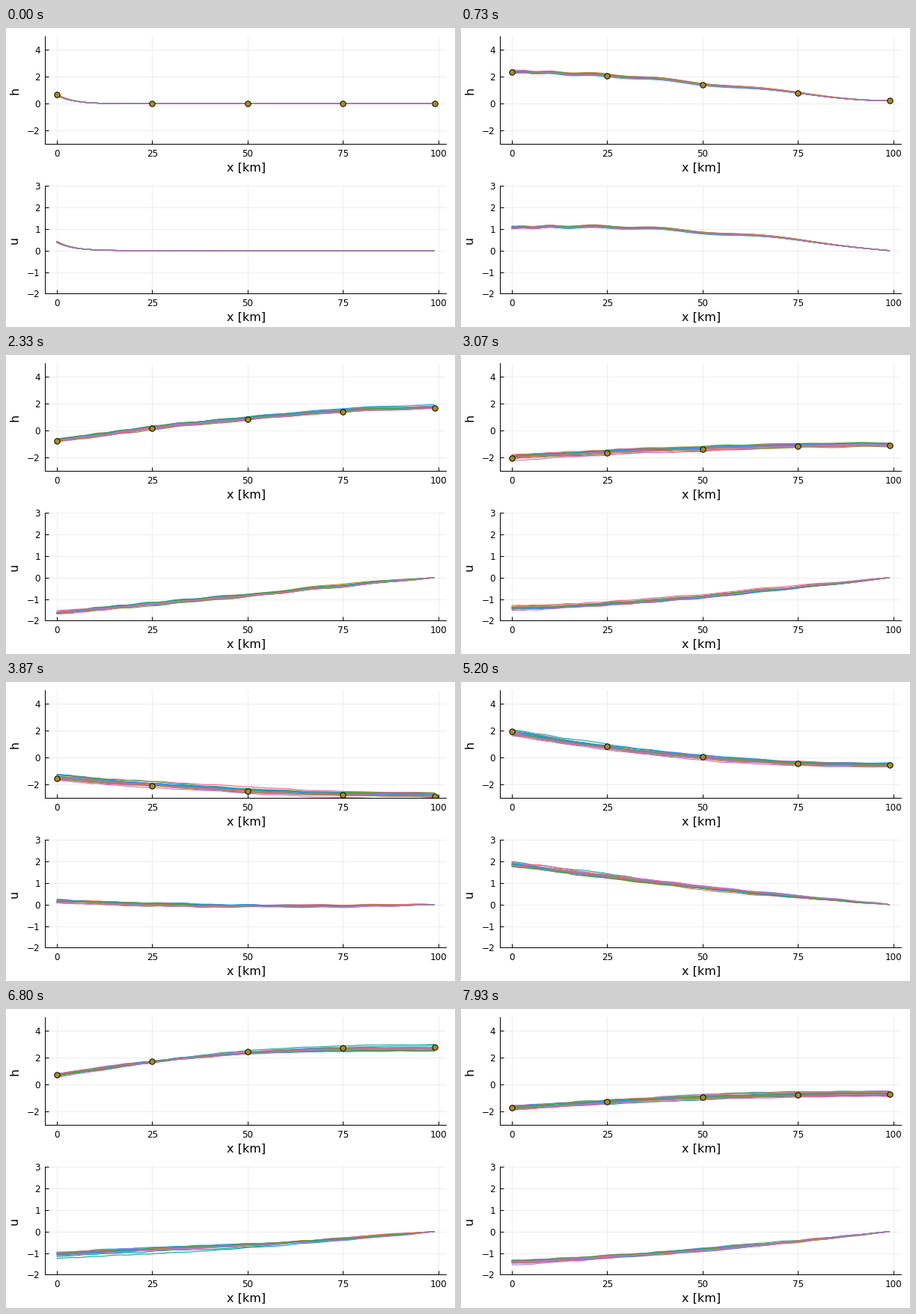
Write a matplotlib script that moves like this. It is 600x400 px and loops after 8 s.

```python
import numpy as np
import matplotlib.pyplot as plt
from matplotlib.animation import FuncAnimation
from matplotlib.collections import LineCollection

W, H, DPI = 600, 400, 100
STEPS, LOOP, TICK = 120, 8000, 20
MEMBERS, N = 20, 100
PT = 72 / DPI  # points per pixel

PALETTE = ["#009afa", "#e26f46", "#3da44d", "#c271d2", "#ac8d18", "#00aaae",
           "#ed5e93", "#c68225", "#00a98d", "#8e971d", "#00a9cc", "#9b7fe9",
           "#618df6", "#f06073", "#dd65b6", "#6c9f33"]
STATIONS = [0, 25, 50, 75, 99]

# Water level at the open boundary: step, level, slope per step
TIDE = np.array([
    (0, 0.68, 0.30), (8.5, 2.45, 0), (21, 1.50, -0.10), (35, -0.70, -0.18),
    (48.5, -2.00, 0), (58, -1.45, 0.08), (71, 0.05, 0.21), (78, 1.85, 0.28),
    (83.5, 2.80, 0), (90, 1.95, -0.13), (102, 0.72, -0.14),
    (119, -1.72, -0.07)])


def hermite(t, keys):
    x, y, s = keys.T
    i = np.clip(np.searchsorted(x, t, side="right") - 1, 0, len(x) - 2)
    d = x[i + 1] - x[i]
    p = (t - x[i]) / d
    rise = p * p * (3 - 2 * p)
    return (y[i] + (y[i + 1] - y[i]) * rise
            + d * p * (1 - p) * ((1 - p) * s[i] - p * s[i + 1]))


def boundary():
    """Level at x = 0 for each step: all members, then the observed run."""
    rng = np.random.default_rng(7)
    steps = np.arange(STEPS)
    mean = hermite(steps, TIDE)
    alpha, sigma = 0.91, 0.09
    noise = np.zeros((STEPS, MEMBERS))
    level = np.zeros(MEMBERS)
    for k in steps:
        kick = rng.standard_normal(MEMBERS)
        level = alpha * level + sigma * np.sqrt(1 - alpha ** 2) * kick
        noise[k] = level - 0.8 * level.mean()
    bias = np.interp(steps, [0, 21, 35, 58, 78, 102, 119],
                     [0, -0.05, -0.05, -0.1, 0.14, 0.03, 0])
    return np.column_stack([mean[:, None] + noise, mean + bias])


def simulate():
    """Linear shallow water on a staggered grid, Crank-Nicolson in time."""
    g, depth, dx, dt = 9.81, 20.0, 1000.0, 600.0
    friction = 1 / (0.06 * 86400)
    rate = np.zeros((2 * N, 2 * N))
    for i in range(1, N):
        rate[i, N + i] = -depth / dx
        rate[i, N + i - 1] = depth / dx
    for i in range(N - 1):
        rate[N + i, i + 1] = -g / dx
        rate[N + i, i] = g / dx
        rate[N + i, N + i] = -friction
    eye = np.eye(2 * N)
    left = eye - 0.5 * dt * rate
    right = eye + 0.5 * dt * rate
    right[[0, -1]] = 0  # prescribed level, closed wall
    inverse = np.linalg.inv(left)
    step = inverse @ right
    drive = inverse[:, :1]

    state = np.zeros((2 * N, MEMBERS + 1))
    out = []
    for level in boundary():
        state = step @ state + drive * level
        out.append(state)
    out = np.array(out)
    return out[:, :N], out[:, N:]


def panel(top, ylim, yticks, name):
    left, right, height = 52.3, 588.4, 144
    ax = fig.add_axes([left / W, 1 - (top + height) / H,
                       (right - left) / W, height / H])
    ax.set_xlim((left - 67.7) / 5.1, (right - 67.7) / 5.1)
    ax.set_ylim(*ylim)
    ax.set_xticks([0, 25, 50, 75, 100])
    ax.set_yticks(yticks)
    ax.set_axisbelow(True)
    ax.grid(color="black", alpha=0.1, linewidth=0.7 * PT)
    ax.tick_params(direction="in", length=5 * PT, width=PT,
                   pad=6.5 * PT, labelsize=12 * PT)
    ax.patch.set_visible(False)
    for side in ("top", "right"):
        ax.spines[side].set_visible(False)
    for side in ("left", "bottom"):
        ax.spines[side].set_linewidth(PT)
    size = 16 * PT
    fig.text(321 / W, 1 - (top + 180) / H, "x [km]", fontsize=size,
             ha="center", va="baseline")
    fig.text(16 / W, 1 - (top + 72) / H, name, fontsize=size, rotation=90,
             rotation_mode="anchor", ha="center", va="baseline")
    return ax


def ensemble(ax):
    colors = [PALETTE[m % len(PALETTE)] for m in range(MEMBERS)]
    lines = LineCollection([], colors=colors, linewidths=1.1 * PT, zorder=2)
    return ax.add_collection(lines, autolim=False)


def curves(values):
    return [np.column_stack([km, v]) for v in values.T[:MEMBERS]]


plt.rcParams["font.family"] = "DejaVu Sans"
fig = plt.figure(figsize=(W / DPI, H / DPI), dpi=DPI, facecolor="white")
ax_h = panel(11.4, (-3, 5), [-2, 0, 2, 4], "h")
ax_u = panel(211.4, (-2, 3), [-2, -1, 0, 1, 2, 3], "u")

h_lines, u_lines = ensemble(ax_h), ensemble(ax_u)
dots, = ax_h.plot([], [], "o", markersize=7.4 * PT, markerfacecolor=PALETTE[4],
                  markeredgecolor="black", markeredgewidth=PT, zorder=2.4)

km = np.arange(N)
h, u = simulate()


def draw(tick):
    # steps begin on whole hundredths of a second
    k = int((tick * TICK + 15) * STEPS / LOOP)
    h_lines.set_segments(curves(h[k]))
    u_lines.set_segments(curves(u[k]))
    dots.set_data(STATIONS, h[k, STATIONS, MEMBERS])
    return h_lines, u_lines, dots


anim = FuncAnimation(fig, draw, frames=LOOP // TICK, interval=TICK,
                     repeat=True, repeat_delay=0, blit=False)
plt.show()
```
